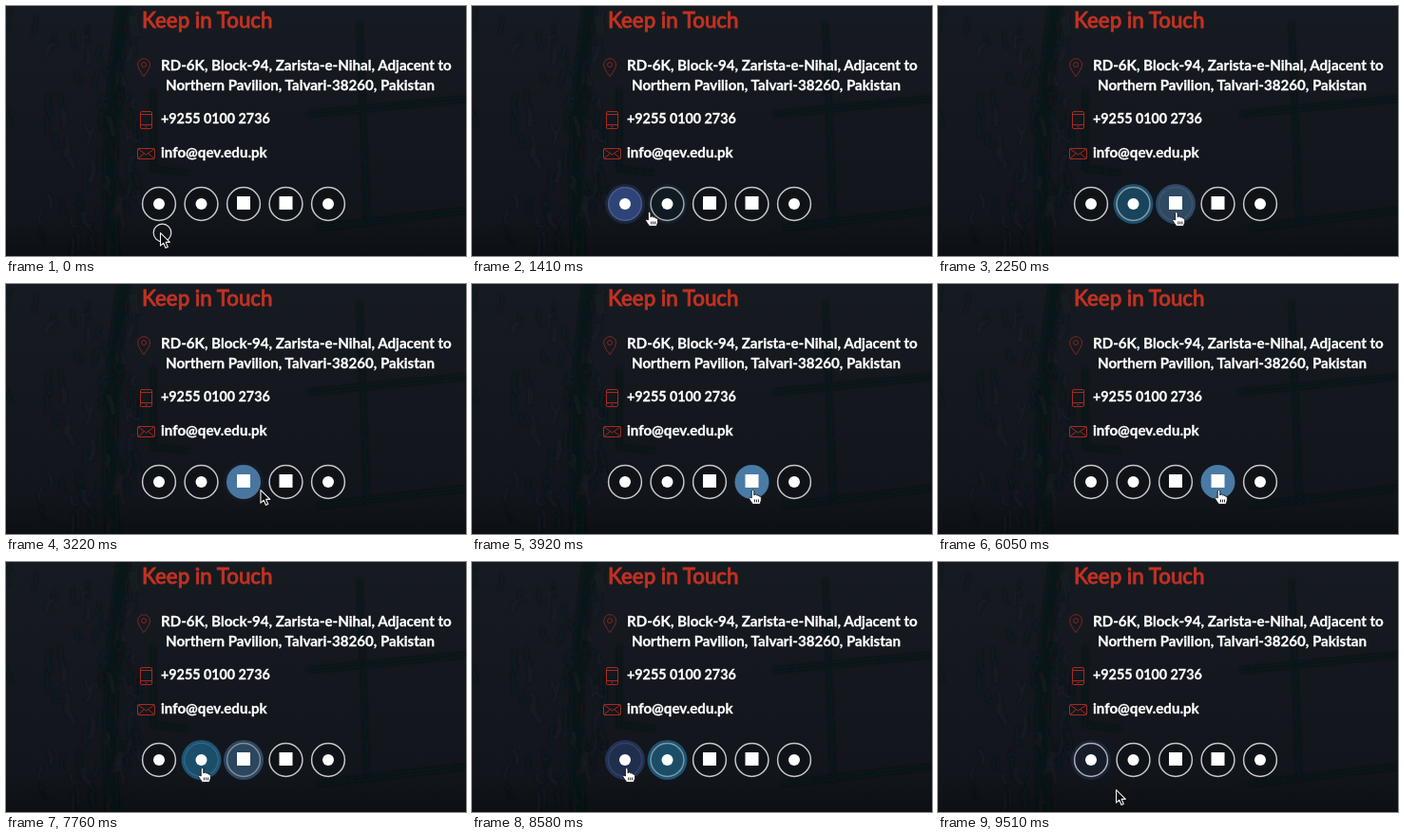
These frames come from a looping animation (484x264 px, 9.61 s). An HTML page:

```html
<!DOCTYPE html>
<html lang="en">
<head>
<meta charset="utf-8">
<title>Keep in Touch</title>
<style>
html, body { margin: 0; width: 100%; height: 100%; overflow: hidden; background: #12171c; }
svg { display: block; width: 484px; height: 264px; }
text { font-family: Lato, "Open Sans", sans-serif; font-weight: 700; font-size: 15.1px; fill: #fff; stroke: #fff; stroke-width: .3px; }
.title { font-weight: 500; font-size: 22.3px; fill: #c23222; stroke: #c23222; stroke-width: .8px; }
.phone { font-size: 14.3px; }
.red { fill: none; stroke: #a82a1f; stroke-linejoin: round; }
</style>
</head>
<body>
<svg viewBox="0 0 484 264">
  <defs>
    <linearGradient id="shade" x1="0" y1="0" x2="0" y2="1">
      <stop offset="0" stop-color="#161b21"/>
      <stop offset=".85" stop-color="#12161c"/>
      <stop offset="1" stop-color="#0c0f13"/>
    </linearGradient>
    <filter id="soft" x="-30%" y="-30%" width="160%" height="160%"><feGaussianBlur stdDeviation="1.5"/></filter>
    <filter id="edge" x="-20%" y="-20%" width="140%" height="140%"><feGaussianBlur stdDeviation=".7"/></filter>
  </defs>

  <rect width="484" height="264" fill="url(#shade)"/>
  <g id="paint" fill="none" stroke="#0b0f13" stroke-linecap="round" filter="url(#soft)">
    <g opacity=".55">
      <path d="M112 264Q104 130 124 0" stroke-width="14"/>
      <path d="M155 90V172L190 176M372 20L380 230" stroke-width="5"/>
      <path d="M320 114L484 98M330 234L484 216" stroke-width="6"/>
    </g>
  </g>

  <text class="title" x="143" y="23">Keep in Touch</text>
  <text x="163" y="68">RD-6K, Block-94, Zarista-e-Nihal, Adjacent to</text>
  <text x="168" y="89">Northern Pavilion, Talvari-38260, Pakistan</text>
  <text class="phone" x="163" y="124">+9255 0100 2736</text>
  <text x="163" y="160">info@qev.edu.pk</text>

  <g class="red">
    <path opacity=".75" d="M145 74.5Q138.700 66 138.700 62A6.400 6.400 0 0 1 151.500 62Q151.500 66 145 74.500Z"/>
    <circle opacity=".75" cx="145" cy="62" r="2.500"/>
    <rect x="141.500" y="111.500" width="12" height="18" rx="1.500"/>
    <path d="M141.500 114.500H153.500M141.500 125.500H153.500M146.500 127.500H148.500"/>
    <rect x="138.500" y="150.500" width="18" height="11" rx="1"/>
    <path d="M139 151L147.500 157L156 151M139 161L145 156M156 161L150 156"/>
  </g>

  <g id="icons"></g>

  <circle id="ring" cx="164.500" cy="239.500" r="9.300" fill="none" stroke="#e4e4e4" stroke-width="1.200"/>
  <g id="cursor" stroke-linejoin="round">
    <path id="arrow" d="M.5 .6V14.200L3.700 11.300L6 16.500L8.300 15.500L6.100 10.400H10.300Z" fill="#0a0a0a" stroke="#f4f4f4" stroke-width="1.100"/>
    <path id="hand" d="M-1.300 9V1.700Q0 -.8 1.300 1.700V6Q3 4 4 6Q6 5 6.500 7Q8.800 6.500 8.800 8.500V11.500Q8 14 7.400 15.600H.1Q-2 13 -4 9.500Q-3.500 7.300 -1.300 9ZM2 10.500V13.500M4 10.500V13.500M6 10.500V13.500" fill="#fff" stroke="#111" stroke-width=".9"/>
  </g>
</svg>
<script>
const LOOP = 9610, FADE = 400;
const $ = id => document.getElementById(id);

function add(parent, tag, attrs) {
  const el = document.createElementNS("http://www.w3.org/2000/svg", tag);
  for (const k in attrs) el.setAttribute(k, attrs[k]);
  return parent.appendChild(el);
}

// Faint brush strokes for the tree on the left
let seed = 11;
const rnd = () => (seed = seed * 16807 % 2147483647) / 2147483647;
for (let i = 0; i < 90; i++) {
  const x = 140 * Math.sqrt(rnd()), y = rnd() * 250;
  add($("paint"), "path", {
    d: `M${x} ${y}q${rnd() * 10 - 5} ${rnd() * 12} ${rnd() * 12 - 6} ${8 + rnd() * 14}`,
    stroke: rnd() < .6 ? "#0c1014" : "#1c232a", "stroke-width": 2 + rnd() * 3, opacity: .35
  });
}

const buttonX = i => 161 + 44.5 * i;
const buttons = ["#36508f", "#2a94c8", "#4a7aa4", "#4a7ba5", "#c03424"].map((color, i) => {
  const g = add($("icons"), "g", { transform: `translate(${buttonX(i)} 209)` });
  const disc = (r, fill, more) => add(g, "circle", { r, fill, ...more });
  const halo = disc(21, color, { filter: "url(#edge)" });
  disc(17.5, "#0f1318");
  const fill = disc(18, color);
  const rim = disc(17.4, "none", { stroke: "#c6c8ca", "stroke-width": 1.5 });
  if (i === 2 || i === 3) add(g, "rect", { x: -7, y: -8, width: 14, height: 14, fill: "#fff" });
  else disc(6, "#fff");
  return { halo, fill, rim };
});

// Pointer moves: start, duration, button reached (-1 is empty space)
const REST = { x: 162, y: 239 }, EXIT = { x: 187, y: 240 };
const moves = [
  [560, 250, 0], [1250, 300, 1], [1990, 270, 2], [2990, 560, 3], [3920, 280, 4],
  [5510, 270, 3], [6430, 250, 2], [7590, 130, 1], [8350, 250, 0], [9190, 200, -1]
].map(([start, span, button]) => ({
  start, span, button,
  leave: start + .4 * span,
  enter: start + .5 * span,
  to: button < 0 ? EXIT : { x: buttonX(button) + 1, y: 217 }
}));
const hovers = moves.slice(0, -1).map((m, i) => ({ button: m.button, on: m.enter, off: moves[i + 1].leave }));

const clamp = u => Math.min(1, Math.max(0, u));
const smooth = u => u * u * (3 - 2 * u);
const fade = dt => 1 - (1 - clamp(dt / FADE)) ** 2;

function pointerAt(t) {
  let { x, y } = REST;
  for (const m of moves) {
    const u = smooth(clamp((t - m.start) / m.span));
    x += (m.to.x - x) * u;
    y += (m.to.y - y) * u;
  }
  return `translate(${x} ${y})`;
}

function draw(t) {
  const active = hovers.find(h => t >= h.on && t < h.off);
  buttons.forEach((b, i) => {
    const p = hovers.filter(h => h.button === i)
      .reduce((sum, h) => sum + fade(t - h.on) - fade(t - h.off), 0);
    const entering = active && active.button === i;
    b.fill.setAttribute("opacity", p);
    b.halo.setAttribute("opacity", Math.sin(Math.PI * p) * .5);
    b.rim.setAttribute("opacity", (1 - p) ** (entering ? 4 : 1));
  });
  $("cursor").setAttribute("transform", pointerAt(t));
  $("hand").style.display = active ? "" : "none";
  $("arrow").style.display = active ? "none" : "";
  $("ring").style.display = t < 30 ? "" : "none";
}

const start = performance.now();
function tick() {
  draw((performance.now() - start) % LOOP);
  requestAnimationFrame(tick);
}
tick();
</script>
</body>
</html>
```
